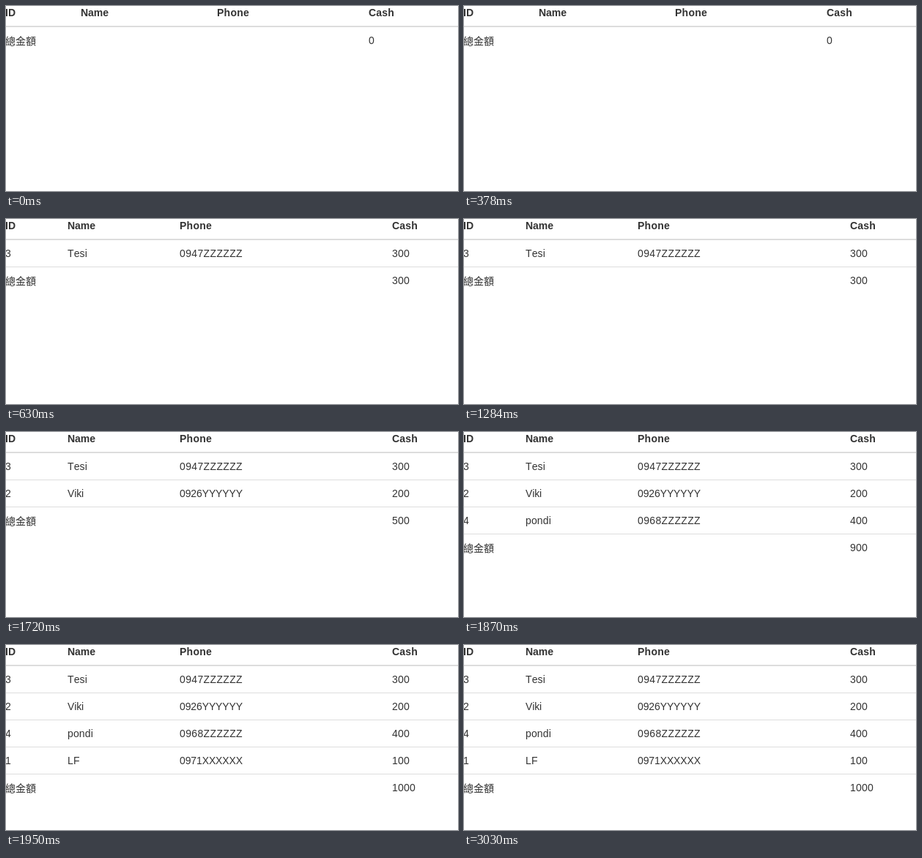
Recreate the animation shown at these times as an HTML page. Size 617x253 px, loop 3.75 s.

```html
<!DOCTYPE html>
<html lang="zh-Hant">
<head>
<meta charset="utf-8">
<title>Cash table</title>
<style>
  html, body { margin: 0; width: 100%; height: 100%; overflow: hidden; background: #fff; }
  body {
    position: relative;
    font: 14px/20px "Liberation Sans", Arial, "Noto Sans CJK TC", "Noto Sans CJK", sans-serif;
    font-kerning: none;
    color: #333;
    white-space: nowrap;
    --name: 84px; --phone: 237px; --cash: 527px;
    animation: columns 3750ms step-end infinite;
  }
  .head, .row, .total { position: relative; box-sizing: border-box; }
  .head { height: 29px; border-bottom: 2px solid #ddd; font-weight: bold; }
  .row { height: 37px; border-bottom: 1px solid #ddd; }
  .total { height: 37px; }
  .cell { position: absolute; top: 8px; left: -1px; }
  .head .cell { top: -1px; }
  .total .label { top: 9px; }
  .name { left: var(--name); }
  .phone { left: var(--phone); }
  .cash { left: var(--cash); }

  .list { overflow: hidden; animation: grow 3750ms step-end infinite; }
  .window { height: 20px; overflow: hidden; }
  .reel { animation: count 3750ms step-end infinite; }
  .reel div { height: 20px; }

  @keyframes columns {
    0% { --name: 102px; --phone: 288px; --cash: 495px; }
    16.8%, 100% { --name: 84px; --phone: 237px; --cash: 527px; }
  }
  @keyframes grow {
    0% { height: 0; }
    16.8% { height: 37px; }
    45.8667% { height: 74px; }
    49.8667% { height: 111px; }
    52%, 100% { height: 148px; }
  }
  @keyframes count {
    0% { transform: translateY(0); }
    16.8% { transform: translateY(-20px); }
    45.8667% { transform: translateY(-40px); }
    49.8667% { transform: translateY(-60px); }
    52%, 100% { transform: translateY(-80px); }
  }
</style>
</head>
<body>
<div class="head">
  <div class="cell text">ID</div>
  <div class="cell name text">Name</div>
  <div class="cell phone text">Phone</div>
  <div class="cell cash text">Cash</div>
</div>
<div class="list"></div>
<div class="total">
  <div class="cell label text">總金額</div>
  <div class="cell cash window"><div class="reel"></div></div>
</div>
<script>
  const people = [
    [3, "Tesi", "0947ZZZZZZ", 300],
    [2, "Viki", "0926YYYYYY", 200],
    [4, "pondi", "0968ZZZZZZ", 400],
    [1, "LF", "0971XXXXXX", 100],
  ];
  const list = document.querySelector(".list");
  const reel = document.querySelector(".reel");

  function add(parent, className, text = "") {
    const el = document.createElement("div");
    el.className = className;
    el.textContent = text;
    return parent.appendChild(el);
  }

  let sum = 0;
  add(reel, "text", sum);
  for (const [id, name, phone, cash] of people) {
    const row = add(list, "row");
    add(row, "cell text", id);
    add(row, "cell name text", name);
    add(row, "cell phone text", phone);
    add(row, "cell cash text", cash);
    sum += cash;
    add(reel, "text", sum);
  }

  // Space letters as if every advance were a whole number of pixels.
  const pen = document.createElement("canvas").getContext("2d");
  for (const el of document.querySelectorAll(".text")) {
    const style = getComputedStyle(el);
    pen.font = `${style.fontWeight} ${style.fontSize} ${style.fontFamily}`;
    const chars = [...el.textContent];
    const slack = chars.reduce((total, c) => {
      const width = pen.measureText(c).width;
      return total + Math.round(width) - width;
    }, 0);
    el.style.letterSpacing = `${slack / chars.length}px`;
  }
</script>
</body>
</html>
```
